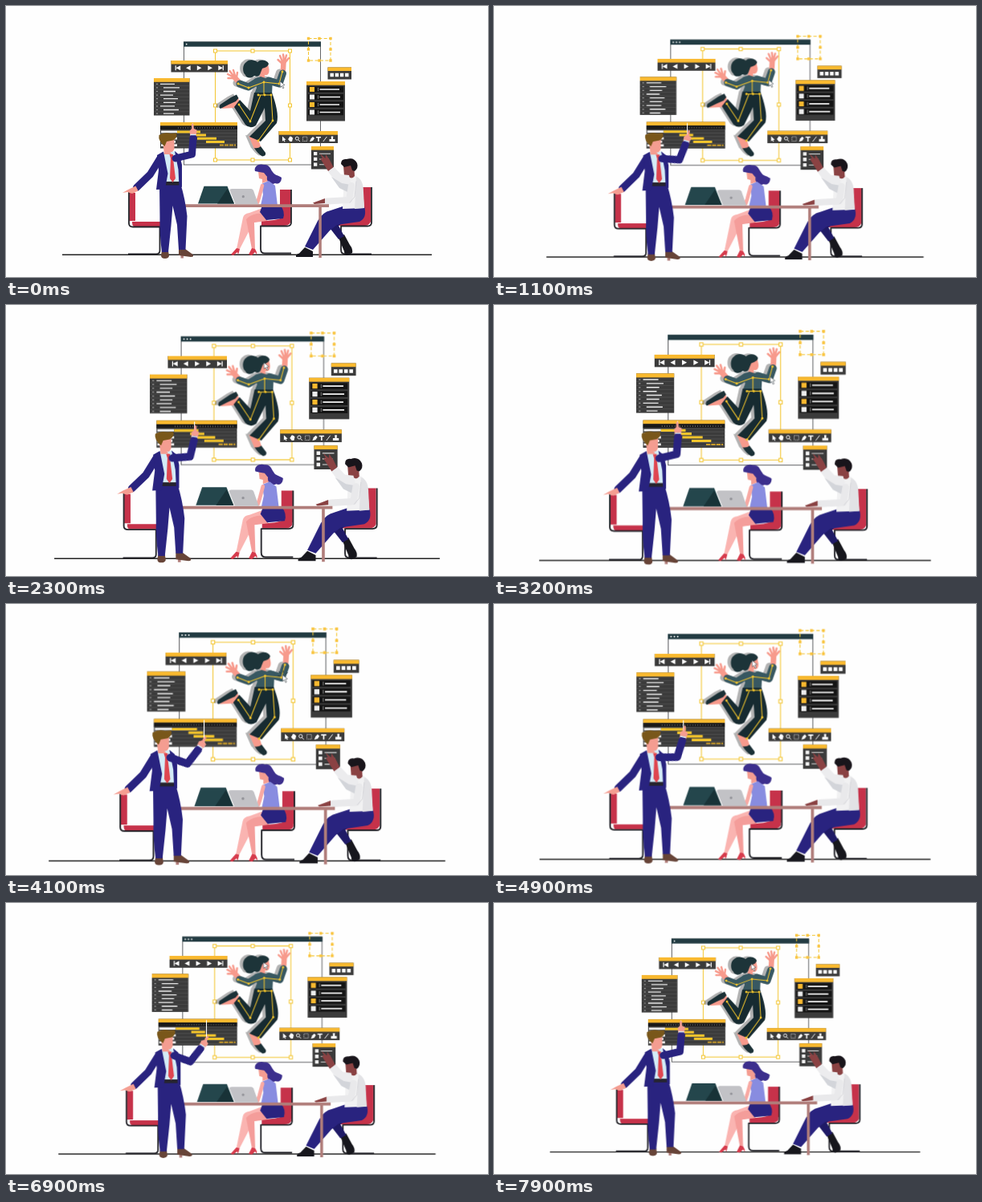
Recreate the animation shown at these times as an HTML page. Size 600 px wide and 338 px high, loop 8000 ms.

```html
<!DOCTYPE html>
<html lang="en">
<head>
<meta charset="utf-8">
<title>Design team meeting</title>
<style>
  html, body { margin: 0; width: 100%; height: 100%; overflow: hidden; background: #fefefe; }
  svg { display: block; width: 100%; height: 100%; }
  :root { --beat: calc(8s / 3); }
  .line { fill: none; stroke-linecap: round; stroke-linejoin: round; }
  .gold { fill: #f9b92f; }
  .panel { fill: #3b3b3b; }
  .skin { fill: #f49d91; }
  .dark-skin { fill: #8a4243; }
  .navy { fill: #29237f; }
  .red { fill: #c6324a; }
  .frame { fill: none; stroke: #24242a; stroke-width: 1.8; stroke-linejoin: round; }

  #scene { transform-origin: 300px 169px; animation: zoom 4s linear infinite alternate; }
  #arm { transform-origin: 211px 190px; animation: point var(--beat) infinite; }
  #playhead { animation: scrub var(--beat) infinite; }
  #cursor { animation: hop var(--beat) linear infinite; }
  #click { animation: click var(--beat) step-end infinite; }
  #dot { animation: dot var(--beat) step-end infinite; }
  #dots { animation: dots var(--beat) step-end infinite; }
  #shade { filter: brightness(0) opacity(.3); }

  @keyframes zoom { to { transform: scale(1.075); } }
  @keyframes point {
    0%, 25% { transform: rotate(0); animation-timing-function: ease-in-out; }
    57%, 62% { transform: rotate(34deg); animation-timing-function: ease-in-out; }
  }
  @keyframes scrub {
    0%, 25% { transform: translateX(0); animation-timing-function: ease-in-out; }
    57%, 62% { transform: translateX(18px); animation-timing-function: ease-in-out; }
  }
  @keyframes hop {
    0%, 54% { transform: translate(341px, 94px); }
    58%, 100% { transform: translate(320px, 76px); }
  }
  @keyframes click { 0% { opacity: 0; } 49% { opacity: 1; } 55% { opacity: 0; } }
  @keyframes dot { 0% { opacity: 1; } 8% { opacity: 0; } 25% { opacity: 1; } }
  @keyframes dots { 0% { opacity: 0; } 25% { opacity: 1; } 93% { opacity: 0; } }
</style>
</head>
<body>
<svg viewBox="0 0 600 338" preserveAspectRatio="none">
<defs>
  <rect id="knob" x="-2" y="-2" width="4" height="4" fill="#fff" stroke="#f3c52f"/>
  <rect id="pip" x="-1.7" y="-1.7" width="3.4" height="3.4" fill="#f9c440"/>
  <path id="play" d="M-2.7-3 3 0-2.7 3Z" fill="#fff"/>
  <g id="jumper">
    <!-- head -->
    <path d="M318 74C321 75 324 73 326 72L327.5 79C328 84 326 87 322 86L322 92 315 91 317 82C314 80 315 75 318 74Z" fill="#f79a8c"/>
    <path d="M299 70C303 66 309 67 313 70C317 66 325 67 327 72C326 76 322 77 319 78L317 83C316 87 313 89 309 87C305 91 299 90 298 86C294 83 294 73 299 70Z" fill="#1d3439"/>
    <!-- shirt -->
    <g class="line" stroke="#385861" stroke-width="9">
      <path d="M291 97 302 101 313 94M327 93 340 97 344.5 84"/>
    </g>
    <path d="M309 91 317 88 323 90 332 90 331 111 309 110 312 102Z" fill="#385861"/>
    <!-- legs -->
    <path d="M302 162 314 166 318 178 322 184 309 178ZM289 114 291 122 284 127 268 128 276 121Z" fill="#f79a8c"/>
    <path d="M309 177Q314 178 317 175L323 183Q324 187 319 187.5Q313 184 309 177ZM287 110.5 289.5 115 286 119 277 123 267 128Q264.5 127 266.5 123L280 114Z" fill="#1b3036"/>
    <path d="M309 108H331C336 122 340 137 337 146L317 169 303 163 323 143 322 127 311 149Q304 154 298 148L284 126 291 117 304 131Z" fill="#172b31"/>
  </g>
</defs>

<g id="scene">
  <!-- canvas window -->
  <rect x="221.5" y="45" width="170" height="153" fill="none" stroke="#55575a" stroke-width=".9"/>
  <rect x="221" y="44.5" width="171" height="6.2" fill="#223b42"/>
  <g fill="#fff">
    <circle id="dot" cx="224.7" cy="47.6" r=".9"/>
    <g id="dots"><circle cx="228.6" cy="47.6" r=".9"/><circle cx="232.5" cy="47.6" r=".9"/></g>
  </g>
  <g fill="none" stroke="#f3c52f">
    <path d="M260.5 56H353.5V192H260.5Z"/>
    <path d="M376.5 40.5H404V68H376.5Z" stroke-dasharray="4 2.4"/>
  </g>
  <use href="#pip" x="376.5" y="40.5"/><use href="#pip" x="390" y="40.5"/><use href="#pip" x="404" y="40.5"/>
  <use href="#pip" x="376.5" y="54"/><use href="#pip" x="404" y="54"/>
  <use href="#pip" x="376.5" y="68"/><use href="#pip" x="390" y="68"/><use href="#pip" x="404" y="68"/>
  <use href="#knob" x="260.5" y="56"/><use href="#knob" x="307" y="56"/><use href="#knob" x="353.5" y="56"/>
  <use href="#knob" x="260.5" y="124"/><use href="#knob" x="353.5" y="124"/>
  <use href="#knob" x="260.5" y="192"/><use href="#knob" x="307" y="192"/><use href="#knob" x="353.5" y="192"/>

  <!-- rigged figure -->
  <use id="shade" href="#jumper" x="-4" y="-1"/>
  <g class="line" stroke="#f79a8c" stroke-width="2.4">
    <path d="M282 90 276.5 90M282 88 276 85M283 87 278.5 81M285 87 283 80M287 89 288 83"/>
    <path d="M344 72 338.5 67M344 69 341 62M346 68 345 60.5M347 69 349 61.5M347 71 352 65"/>
    <path d="M290 95 284.5 89M345 79 345.5 70" stroke-width="6.5"/>
  </g>
  <use href="#jumper"/>
  <g class="line" stroke="#f5c62c" stroke-width="1">
    <path d="M289 97 302 102 321 95 340 97 344 82M321 95V111M314 111H330L332 143 314 168M317 111 304 144 290 123"/>
    <path d="M289 97h0M302 102h0M321 95h0M340 97h0M344 82h0M314 111h0M322 111h0M330 111h0M332 143h0M314 168h0M304 144h0M290 123h0" stroke-width="2.8"/>
  </g>
  <g id="cursor">
    <path d="M0 0 6 4.5 3.5 5 5 8.2 3.6 8.8 2.2 5.7.3 7.3Z" fill="#fff" stroke="#4b5357" stroke-width=".6"/>
    <path id="click" class="line" d="M-2-2-4-4M1-3V-5M-3 1H-5M4-1 6-3" stroke="#27383d" stroke-width=".9"/>
  </g>

  <!-- player -->
  <rect class="panel" x="205.5" y="68" width="70.5" height="14.5"/>
  <rect class="gold" x="205.5" y="68" width="70.5" height="4.5"/>
  <path d="M211.2 74.2V80.2M270.3 74.2V80.2" stroke="#fff" stroke-width="1.2"/>
  <use href="#play" transform="translate(214.5 77.2) scale(-1 1)"/>
  <use href="#play" transform="translate(227 77.2) scale(-1 1)"/>
  <use href="#play" x="240.5" y="77.2"/><use href="#play" x="254" y="77.2"/><use href="#play" x="267" y="77.2"/>

  <!-- layer list -->
  <rect class="panel" x="184" y="90" width="44.5" height="46.5"/>
  <rect class="gold" x="184" y="90" width="44.5" height="4.8"/>
  <path d="M184 99.6H228M184 104.2H228M184 108.8H228M184 113.4H228M184 118H228M184 122.6H228M184 127.2H228M184 131.8H228" stroke="#5c5c5c" stroke-width=".5"/>
  <path d="M188 95V136" stroke="#999" stroke-width="2.2" stroke-dasharray="1.2 3.4" stroke-dashoffset="-1.7"/>
  <path d="M192 97.3H210M196 101.9H216M196 106.5H211M192 111.1H208M196 115.7H214M196 120.3H211M192 124.9H210M196 129.5H215M196 134.1H209" stroke="#eee" stroke-width="1.3"/>

  <!-- timeline -->
  <rect class="panel" x="192" y="145" width="96" height="32.5"/>
  <rect class="gold" x="192" y="145" width="96" height="4.5"/>
  <rect x="192" y="149.5" width="96" height="5" fill="#191919"/>
  <path d="M214 152H286" stroke="#888" stroke-width="1.6" stroke-dasharray=".6 2.4"/>
  <path d="M192 154.5H288M192 158.7H288M192 162.9H288M192 167.1H288M192 171.3H288M192 175.5H288" stroke="#5c5c5c" stroke-width=".6"/>
  <path d="M193 156.8H213M193 161H211M193 165.2H213M193 169.4H211M193 173.6H213" stroke="#f4f4f4" stroke-width="2.7"/>
  <g stroke="#f4c52c" stroke-width="3">
    <path d="M213 157H242M232 161H249M238 165.2H262M249 169.4H272"/>
    <path d="M266 173.6H286" stroke="#c99c2c" stroke-width="2" stroke-dasharray="5 1"/>
  </g>
  <path id="playhead" d="M232.5 146.5V177.5" stroke="#fff" stroke-width="1.1"/>

  <!-- swatches -->
  <rect class="panel" x="400.5" y="76.5" width="29.5" height="15"/>
  <rect class="gold" x="400.5" y="76.5" width="29.5" height="4.5"/>
  <path d="M403.5 86H427" stroke="#fff" stroke-width="4.4" stroke-dasharray="4.4 1.8"/>

  <!-- properties -->
  <rect class="panel" x="374" y="94" width="48" height="49.5"/>
  <rect class="gold" x="374" y="94" width="48" height="4.7"/>
  <path d="M376 104H420M376 113.5H420M376 123H420M376 132.5H420" stroke="#141414" stroke-width="7.6"/>
  <path d="M390.5 104H415M390.5 113.5H416M390.5 123H415M390.5 132.5H416" stroke="#f4f4f4" stroke-width="1.7"/>
  <path d="M388.5 101.8V106.2M388.5 111.3V115.7M388.5 120.8V125.2M388.5 130.3V134.7" stroke="#aaa" stroke-width=".7"/>
  <path class="gold" d="M378 101h6v6h-6zM378 120h6v6h-6z"/>
  <path d="M378 110.5h6v6h-6zM378 129.5h6v6h-6z" fill="#eee"/>

  <!-- toolbar -->
  <rect class="panel" x="339.5" y="156" width="73.5" height="15"/>
  <rect class="gold" x="339.5" y="156" width="73.5" height="4.7"/>
  <g fill="#fff">
    <path d="M344 162.5 348.5 166.8 346.5 167 347.5 169 346.5 169.4 345.5 167.5 344 168.8Z"/>
    <path d="M352 165 353 163 354 162.5 356 163.5 357 165 356 169H353.5L351 166Z"/>
    <path d="M378 169.3 379.5 165.5 382 163 384 165 382 168Z"/>
    <path d="M386 163H392V164.5H389.8V169H388.2V164.5H386Z"/>
    <path d="M404.7 162.5H407.3L407 166H409.5V169H402.5V166H405Z"/>
  </g>
  <g fill="none" stroke="#fff" stroke-width=".9">
    <circle cx="362.3" cy="165.2" r="2"/><path d="M363.8 166.8 366 169M394.8 169 399.4 163"/>
    <path d="M369.5 163.2H374.8V168.5H369.5Z" stroke-width=".6" stroke-dasharray="1.2 .7"/>
  </g>

  <!-- side panel -->
  <rect class="panel" x="380" y="175" width="28" height="28.5"/>
  <rect class="gold" x="380" y="175" width="28" height="4.6"/>
  <path d="M383 182h4.3v4.3h-4.3zM383 188.7h4.3v4.3h-4.3zM383 195.5h4.3v4.3h-4.3z" fill="#f4f4f4"/>
  <path d="M390 184.2H404M390 190.9H402M390 197.7H404" stroke="#ddd"/>

  <path d="M70 310.2H530" stroke="#222" stroke-width="1.4"/>

  <!-- chairs -->
  <path class="red" d="M153.5 233H161V268H153.5ZM157 269H192V275H160Q157 275 157 269ZM341 229H354.5V267H341ZM318 268Q336 268 344 264H354V270Q352 274 346 274H318ZM441 226H454V266H441ZM411 267Q434 267 443 262H454V269Q452 274 446 274H411Z"/>
  <path class="frame" d="M153 232V271Q153 275.5 158 275.5H191.5V305Q191.5 309.3 187 309.3H152M355 229V270Q355 274.5 350 274.5H317V303Q317 308.5 322 308.5H355M455 226V270Q455 274.5 450 274.5H417V304Q417 309.3 422 309.3H455"/>

  <!-- seated woman -->
  <g>
    <path class="skin" d="M314 206 321 203 324 211 327 218 319 221 319 216 315 215Z"/>
    <path d="M310 206C308 199 316 196 321 198C328 197 329 203 332 207C334 211 339 211 343 214C343 220 339 223 335 221C329 224 324 219 325 213L321 208 315 207Z" fill="#3c2f8d"/>
    <path d="M322 251 328 266 308 270 291 303 287 303 295 264Q296 259 303 258Z" fill="#fab4b1"/>
    <path d="M326 258 325 268 309 270 310 303 306 303 299 266Q303 261 312 259Z" fill="#f49d9a"/>
    <path d="M287 302 291 303 290 307 289 310 288 307 283 311 280 310ZM306 302 310 303 312 307 312 310 310 307 306 311 302 310Z" fill="#d63b4c"/>
    <path d="M318 222 327 218 335 224 338 249 317 249 320 235Z" fill="#888ce0"/>
    <path d="M319 249 341 248Q348 256 345 265L324 267 316 257Z" fill="#29237f"/>
    <path class="line" d="M319 224 315 239 313 245" stroke="#f8a9a3" stroke-width="4.5"/>
  </g>

  <!-- seated man -->
  <g>
    <path d="M414 289 421 285 428 298Q432 303 431 308L425 311Q421 311 421 306Z" fill="#17171d"/>
    <path d="M400 262 432 260 414 274 421 287 414 291 400 273Z" fill="#1f1a66"/>
    <path d="M419 250H446Q450 264 440 269L412 273 403 280 382 304 372 300 388 268Q394 257 404 255Z" class="navy"/>
    <path d="M372 301 382 306 382 313H361Q360 310 365 308.5Z" fill="#17171d"/>
    <path d="M422 211 434 211Q443 214 444 229L446 252 419 253 420 231Z" fill="#f1f1f2"/>
    <path d="M436 213Q445 216 445 232L446 252 434 253Z" fill="#e2e2e5"/>
    <path class="dark-skin" d="M420 199 433 197 434 212Q430 217 426 212L421 212Z"/>
    <path d="M417 197Q417 190 424 191Q433 188 437 196Q439 202 434 206L431 205 429 199 421 201Z" fill="#19151b"/>
    <path d="M400.5 206 408 200.5 417 210 427 211 432 234 416 227Z" fill="#ececee"/>
    <path d="M405 213 418 221 429 223 431 235 415 227Z" fill="#d3d5da"/>
    <path class="dark-skin" d="M401 206 407.5 201 403 192 398 185 397.5 190 391 184 394 190.5 391 190 396 198Z"/>
    <path class="line" d="M430 224 427 242 400 243.5" stroke="#e9e9eb" stroke-width="8"/>
    <path class="line" d="M436 219 434 238 428 245" stroke="#d2d2d7" stroke-width=".8"/>
    <path class="dark-skin" d="M397 240 397 246 384 247 382 245.5 389 243Z"/>
  </g>

  <!-- table and laptops -->
  <path d="M214 247.3H402V251H392.8V314H389.3V251H221V314.5H217.5V251H214Z" fill="#b07d7a"/>
  <path d="M239 246.5 246.5 224.8H275.5L284 246.5Z" fill="#24464c"/>
  <path d="M263 246.5 275.5 228 284 246.5Z" fill="#183237"/>
  <path d="M278.5 229.5Q279 228 281 228H305Q307 228 308 230L314 247.3H285.5Z" fill="#c2c2c6"/>
  <circle cx="295.3" cy="237.7" r="1.6" fill="#939399"/>

  <!-- presenter -->
  <g>
    <path d="M194 305H202L203 312Q202 315 198 315Q193 315 193 311ZM215 303H223L232 309.5Q235 313 230 313L215 311Z" fill="#674438"/>
    <path class="navy" d="M191 221H217Q223 240 225.5 262L223.5 304H215L213 273 207.5 249 205.5 274 202 307H194Q191 284 191.5 263Z"/>
    <path class="line" d="M191.5 190.5 179.5 210 162.5 226.5" stroke="#29237f" stroke-width="9"/>
    <path class="skin" d="M161.5 224.5 164.5 230.5 157 234 151 232 145 233 152 229Z"/>
    <path d="M195 183 211 181 217 196 216 222 196 222Z" fill="#d4ecf7"/>
    <path d="M196 219H216V223.5H196Z" fill="#26242f"/>
    <path class="navy" d="M196 181.5 188 186 190 205 187 229 198 228.5 201.5 209ZM210 181 216 186 219 198 219 226 215.5 225 214.5 204Z"/>
    <path d="M203.5 185 208 185 208 190 211 215 207.5 220 204 215 205 190Z" fill="#df4650"/>
    <path class="skin" d="M195 168 209.5 166 209.5 178Q207.5 183.5 204 182L207 185 197 185Z"/>
    <path d="M190.5 161Q197 157 205 159L212 158.5Q214 164 208 167.5L200 169 197.5 175Q189 168 190.5 161Z" fill="#79571a"/>
    <g id="arm">
      <path class="skin" d="M229.5 164 228.5 156 231 153 231 147.5Q232.5 146 233.4 148L234 153 237.5 154.5 236.5 164Z"/>
      <path class="line" d="M211 190 231.5 185 233 164.5" stroke="#29237f" stroke-width="9"/>
      <path class="line" d="M230 160.5H236" stroke="#d4ecf7" stroke-width="1.4"/>
    </g>
  </g>
</g>
</svg>
</body>
</html>
```
